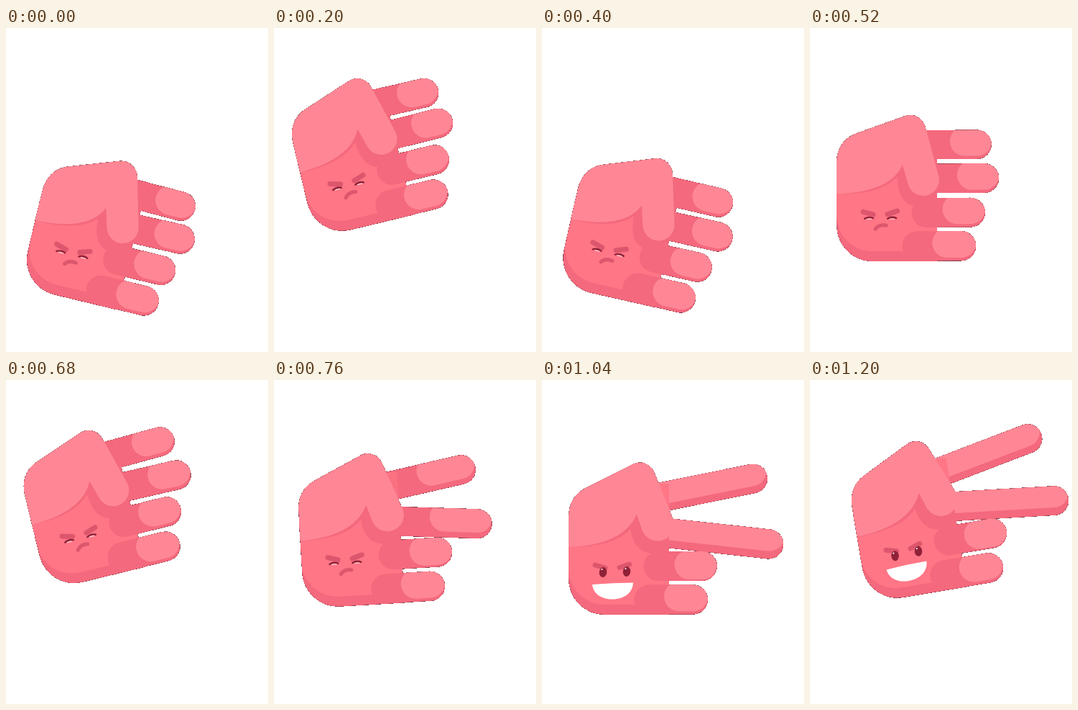
These frames come from a looping animation (365x450 px, 1240 ms). An HTML page with a canvas:

```html
<!DOCTYPE html>
<html lang="en">
<head>
<meta charset="utf-8">
<title>Hand game</title>
<style>
  html, body { margin: 0; width: 100%; height: 100%; overflow: hidden; background: #fff; }
  canvas { display: block; width: 365px; height: 450px; }
</style>
</head>
<body>
<canvas id="stage" width="365" height="450"></canvas>
<script>
const W = 365, H = 450, LOOP = 1240, STEP = 40;
const ctx = document.getElementById('stage').getContext('2d', { willReadFrequently: true });

const LIGHT = '#ff8795', MID = '#ff7686', DARK = '#f4697d', BROW = '#dc566d', EYE = '#8f2238';

// Each track is a list of [time, value], eased between entries.
const tracks = {
  angle: [[0, 13.5], [165, -15], [400, 12.8], [650, -15], [810, 0], [1120, 0], [1200, -9.5]],
  dx: [[1120, 0], [1200, 29.3]],
  dy: [[400, 0], [520, 1], [640, 1], [830, 2], [1120, 2], [1200, 9]],
  open: [[0, -0.05], [560, 0], [640, 0], [860, 1]],
  recoil: [[700, 0], [880, 1], [1040, 0]],
  grin: [[720, 0], [840, 1]]
};

const lerp = (a, b, k) => a + (b - a) * k;

function valueAt(track, t) {
  if (t <= track[0][0]) return track[0][1];
  for (let i = 1; i < track.length; i++) {
    const [t0, a] = track[i - 1], [t1, b] = track[i];
    if (t <= t1) return lerp(a, b, (1 - Math.cos(Math.PI * (t - t0) / (t1 - t0))) / 2);
  }
  return track[track.length - 1][1];
}

function fill(color, path) {
  ctx.fillStyle = color;
  ctx.beginPath();
  path();
  ctx.fill();
}

function stroke(color, width, path) {
  ctx.strokeStyle = color;
  ctx.lineWidth = width;
  ctx.lineCap = 'round';
  ctx.beginPath();
  path();
  ctx.stroke();
}

function capsule(x, y, len, r) {
  ctx.moveTo(x, y - r);
  ctx.arc(x + len, y, r, -Math.PI / 2, Math.PI / 2);
  ctx.arc(x, y, r, Math.PI / 2, Math.PI * 1.5);
  ctx.closePath();
}

// A dark finger with a light pad that starts at the given share of its length.
function finger(x, y, tipX, tipY, r, padStart, shade) {
  const len = Math.hypot(tipX - x, tipY - y);
  ctx.save();
  ctx.translate(x, y);
  ctx.rotate(Math.atan2(tipY - y, tipX - x));
  fill(DARK, () => capsule(0, 0, len, r));
  ctx.clip();
  fill(LIGHT, () => capsule(len * padStart, -shade, len * (1 - padStart), r));
  ctx.restore();
}

function palmPath() {
  ctx.moveTo(37, 200);
  ctx.lineTo(37, 274);
  ctx.arc(87, 274, 50, Math.PI, Math.PI / 2, true);
  ctx.lineTo(177, 324);
  ctx.lineTo(177, 142);
  ctx.lineTo(130, 142);
  ctx.lineTo(60, 170);
  ctx.closePath();
}

function palm(open) {
  ctx.save();
  fill(DARK, palmPath);
  ctx.clip();
  fill(MID, () => {
    ctx.moveTo(37, 140);
    ctx.lineTo(37, 260);
    ctx.arc(87, 260, 50, Math.PI, Math.PI / 2, true);
    ctx.lineTo(178, 310);
    ctx.lineTo(178, 140);
  });
  ctx.globalAlpha = Math.min(1, 1 - open);
  fill(DARK, () => ctx.rect(145, 140, 33, 96));
  ctx.restore();
}

function thumbShadow(k) {
  const m = (a, b) => lerp(a, b, k);
  fill(DARK, () => {
    ctx.moveTo(37, 230);
    ctx.quadraticCurveTo(m(98, 103), m(232, 229), m(121.5, 125), m(207, 203));
    ctx.bezierCurveTo(m(123, 130), m(230, 218), m(128, 140), m(243, 229), m(146, 154), m(248, 229));
    ctx.bezierCurveTo(m(158, 165), m(250, 229), m(170, 172), m(248, 226), 177, m(246, 222));
    ctx.lineTo(177, 190);
    ctx.lineTo(132, 180);
    ctx.closePath();
  });
}

function thumb(k) {
  const m = (a, b) => lerp(a, b, k);
  const tipX = m(158, 164), tipY = m(211, 186), r = m(22, 24);
  const tilt = -m(15.1, 27.3) * Math.PI / 180;
  fill(LIGHT, () => {
    ctx.moveTo(37, 230);
    ctx.lineTo(37, m(189, 186));
    ctx.bezierCurveTo(37, m(168, 171), m(46, 44), m(154, 158), m(62, 58), m(147, 149));
    ctx.arcTo(m(155, 140), m(114, 94),
      tipX + r * Math.cos(tilt), tipY + r * Math.sin(tilt), 22);
    ctx.arc(tipX, tipY, r, tilt, tilt + Math.PI);
    ctx.lineTo(m(129, 135), m(190, 179));
    ctx.quadraticCurveTo(m(112, 114), m(228, 227), 37, 230);
  });
}

function line(x1, y1, x2, y2) {
  ctx.moveTo(x1, y1);
  ctx.lineTo(x2, y2);
}

function face(grin) {
  stroke(BROW, 7, () => {
    line(74, 255, 88, 259);
    line(108, 258.5, 121.5, 254);
  });
  if (grin < 0.3) {
    for (const x of [82, 114]) {
      stroke('#fff', 0.8, () => line(x - 3, 265, x + 4, 265));
      stroke(EYE, 2.4, () => {
        ctx.moveTo(x - 6, 264.5);
        ctx.quadraticCurveTo(x, 261, x + 6, 264);
      });
    }
    stroke(BROW, 5, () => {
      ctx.moveTo(91, 279);
      ctx.quadraticCurveTo(96, 272, 106, 274);
    });
    return;
  }
  for (const [x, y] of [[85, 265], [118, 264]]) {
    fill(EYE, () => ctx.ellipse(x, y, 5.3, 7 * grin, 0.1, 0, Math.PI * 2));
    fill('#fff', () => ctx.arc(x - 1.5, y - 4 * grin, 1.1, 0, Math.PI * 2));
  }
  ctx.save();
  ctx.translate(98.5, 281);
  ctx.scale(grin, grin);
  fill('#fff', () => {
    ctx.moveTo(-28.5, 1);
    ctx.quadraticCurveTo(0, -1.5, 28.5, -1.5);
    ctx.bezierCurveTo(28, 13, 15, 21.5, 0, 21.5);
    ctx.bezierCurveTo(-16, 21.5, -27, 14, -28.5, 1);
  });
  ctx.restore();
}

// One-bit transparency: soft edge pixels either vanish or darken.
function hardenEdges() {
  const image = ctx.getImageData(0, 0, W, H), px = image.data;
  for (let i = 0; i < px.length; i += 4) {
    const a = px[i + 3];
    if (a === 0 || a === 255) continue;
    for (let c = 0; c < 3; c++) px[i + c] *= a / 255;
    px[i + 3] = a < 110 ? 0 : 255;
  }
  ctx.putImageData(image, 0, 0);
}

function draw(t) {
  const p = {};
  for (const name in tracks) p[name] = valueAt(tracks[name], t);
  const { angle, open, recoil, grin } = p;
  const k = Math.max(0, open + recoil) / 2, slide = 14 * recoil;
  const padStart = 0.76 * (1 - open ** 3), shade = 4.5 + 5.5 * open;

  ctx.clearRect(0, 0, W, H);
  ctx.save();
  ctx.translate(87 - 0.6 * angle + p.dx, 274 + 3.33 * angle + 0.0155 * angle * angle + p.dy);
  ctx.rotate(angle * Math.PI / 180);
  ctx.translate(-87, -274);

  finger(160, 162, lerp(233, 294, open) - 5 * recoil, lerp(162, 135, open) - 10 * recoil,
    20.3, padStart, shade);
  finger(160, 209, lerp(243, 316, open), lerp(209, 226, open) + 7 * recoil,
    20.5, padStart + 0.03 * (1 - open), shade + open);
  palm(open);
  thumbShadow(k);
  finger(162 + slide, 256.5, 223.5 + slide, 256.5, 20.5, 0.7, lerp(4.5, 2, open));
  finger(149 + slide, 303, 210.5 + slide, 303, 20.7, 0.68, 4.5);
  thumb(k);
  face(grin);
  ctx.restore();
  hardenEdges();
}

let last = -1;
function tick() {
  const t = Math.floor(performance.now() % LOOP / STEP) * STEP;
  if (t !== last) draw(last = t);
  requestAnimationFrame(tick);
}
tick();
</script>
</body>
</html>
```
